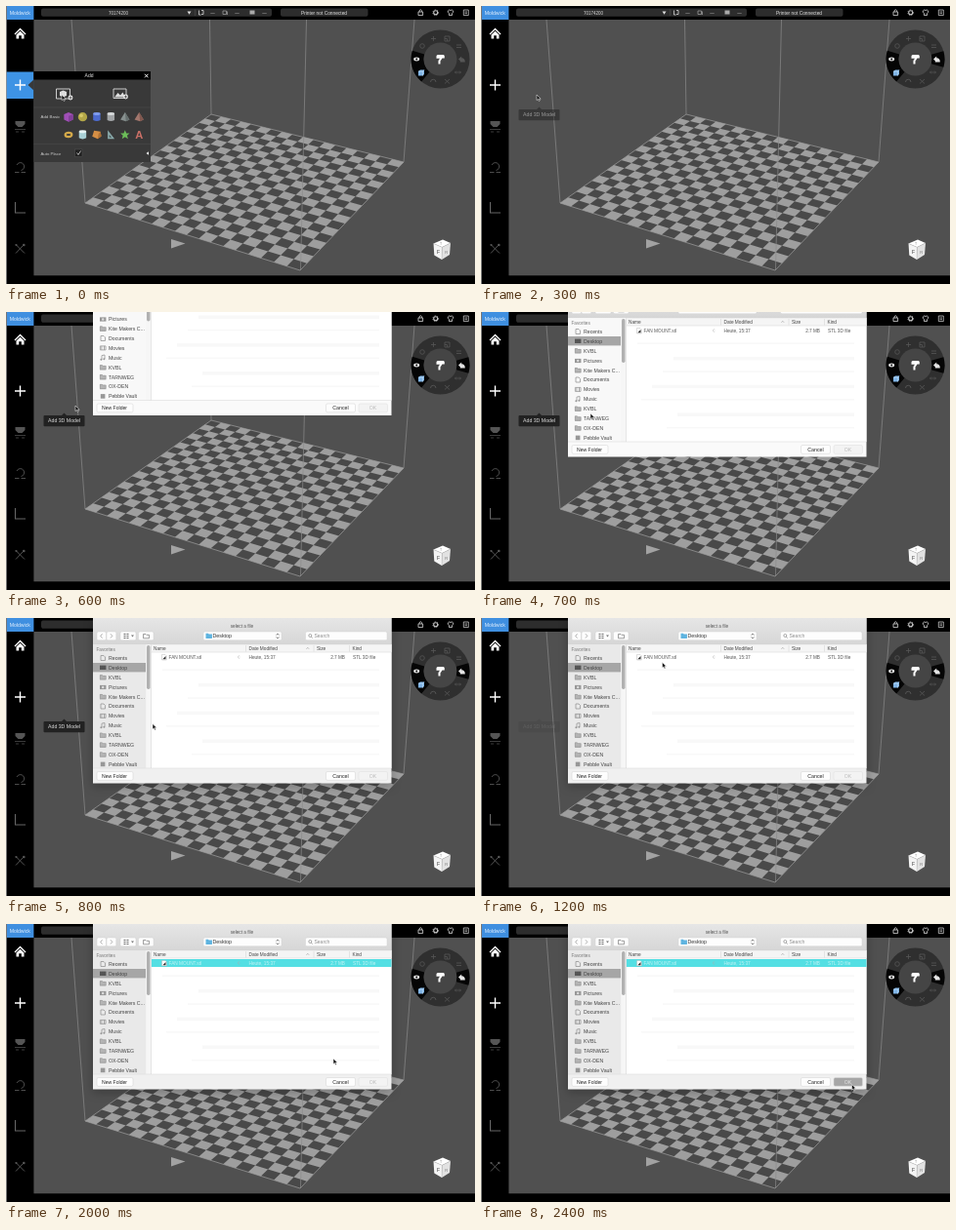
Write an HTML page that moves like this. It is 480 by 285 pixels and loops after 2500 ms.

```html
<!DOCTYPE html>
<html lang="en">
<head>
<meta charset="utf-8">
<title>Add a model</title>
<style>
html, body { margin: 0; width: 100%; height: 100%; overflow: hidden; background: #000; }
svg { display: block; width: 480px; height: 285px; font-family: "Liberation Sans", Arial, sans-serif; }
#dialog.settled { filter: drop-shadow(0 3px 5px rgba(0, 0, 0, .25)); }
</style>
</head>
<body>
<svg id="stage" viewBox="0 0 480 285" xmlns="http://www.w3.org/2000/svg"></svg>
<script>
const LOOP = 2500, STEP = 100;

// ---- drawing helpers ----
const rect = (x, y, w, h, fill, extra = '') =>
  `<rect x="${x}" y="${y}" width="${w}" height="${h}" fill="${fill}" ${extra}/>`;
const text = (x, y, s, size, fill, extra = '') =>
  `<text x="${x}" y="${y}" font-size="${size}" fill="${fill}" ${extra}>${s}</text>`;
const mid = 'text-anchor="middle"';
const path = (d, fill, extra = '') => `<path d="${d}" fill="${fill}" ${extra}/>`;
const line = (d, stroke, w = 1, extra = '') =>
  `<path d="${d}" fill="none" stroke="${stroke}" stroke-width="${w}" ${extra}/>`;
const circle = (x, y, r, fill, extra = '') =>
  `<circle cx="${x}" cy="${y}" r="${r}" fill="${fill}" ${extra}/>`;
const ellipse = (x, y, rx, ry, fill, extra = '') =>
  `<ellipse cx="${x}" cy="${y}" rx="${rx}" ry="${ry}" fill="${fill}" ${extra}/>`;
const at = (x, y, s, k = 1) => `<g transform="translate(${x} ${y}) scale(${k})">${s}</g>`;
const group = (id, s) => `<g id="${id}">${s}</g>`;

// ---- build plate in perspective ----
function floor() {
  const [x0, y0, x1, y1, x2, y2, x3, y3] = [81, 202, 301, 271, 407, 160, 210, 111];
  const ax = x1 - x2, ay = y1 - y2, bx = x3 - x2, by = y3 - y2;
  const sx = x0 - x1 + x2 - x3, sy = y0 - y1 + y2 - y3, den = ax * by - bx * ay;
  const g = (sx * by - bx * sy) / den, h = (ax * sy - sx * ay) / den;
  const pt = (u, v) => {
    const w = g * u + h * v + 1;
    const x = ((x1 - x0 + g * x1) * u + (x3 - x0 + h * x3) * v + x0) / w;
    const y = ((y1 - y0 + g * y1) * u + (y3 - y0 + h * y3) * v + y0) / w;
    return x.toFixed(2) + ' ' + y.toFixed(2);
  };
  const n = 18;
  let d = '';
  for (let i = 0; i < n; i++)
    for (let j = i % 2; j < n; j += 2)
      d += `M${pt(i / n, j / n)}L${pt((i + 1) / n, j / n)}L${pt((i + 1) / n, (j + 1) / n)}L${pt(i / n, (j + 1) / n)}Z`;
  const edge = 'M81 202L301 271L407 160L210 111Z';
  return path(edge, '#494949') + path(d, '#9e9e9e') + line(edge, '#a0a0a0', .7) +
    line('M67 14L81 202M208.5 14L210 111M418 14L407 160M307.5 14L301.5 271', '#8b8b8b', .7) +
    path('M169 239L183.5 243.5L169 248.5Z', '#a2a2a2');
}

// ---- application frame ----
function topBar() {
  const dash = x => text(x, 8.6, '—', 4.5, '#ccc', mid);
  const c = '#c4c4c4';
  return rect(0, 0, 480, 14, '#000') + rect(.8, 0, 27.6, 14, '#3f8fe0') +
    text(14.3, 8.8, 'Moldwick', 5.2, '#e4f0fc', mid) +
    rect(36, 2.5, 236, 8.3, '#2d2d2d', 'rx="2"') + rect(281, 2.5, 89.5, 8.3, '#2d2d2d', 'rx="2"') +
    text(115, 8.6, '70174200', 4.5, '#ddd', mid) +
    path('M185.5 5.5H189.5L187.5 8.8Z', '#ddd') +
    line('M193.5 3.5V10', '#555', .5) +
    line('M197.5 4.5V9H199.5M200 4.5H202V8.5H200', c, .9) + dash(211.5) +
    line('M222 5H225.5V8.5H222ZM226.5 5.5V9', '#999', .8) + dash(236.5) +
    rect(249.5, 4.5, 5, 4, '#aaa') + dash(264.5) +
    text(325.5, 8.6, 'Printer not Connected', 4.85, '#e2e2e2', mid) +
    line('M422 6H426.6V9.6H422ZM423 6V4.7Q424.3 2.7 425.6 4.7V6', c, .9) +
    circle(439.7, 6.7, 2, 'none', `stroke="${c}" stroke-width="1.1"`) +
    circle(439.7, 6.7, 2.8, 'none', `stroke="${c}" stroke-width=".8" stroke-dasharray="1.15 1.2"`) +
    line('M452.3 5Q453 3.4 455 4.4Q457 3.4 457.7 5Q458 7 456.5 7.5V9.6H453.5V7.5Q452 7 452.3 5Z', c, .9) +
    line('M468.3 4H473.3V9.6H468.3ZM469.5 6H472M469.5 7.7H472', c, .8);
}

function sideBar() {
  const dim = '#555';
  return rect(0, 14, 28.4, 271, '#000') + rect(0, 276.3, 480, 8.7, '#000') +
    group('active', rect(0, 67.5, 28.4, 27.5, '#3e93e4') + path('M28.4 75.5L22.5 81L28.4 86.5Z', '#393939')) +
    rect(0, 0, .8, 285, '#8c8c8c') +
    path('M8.5 28.5L14.5 22.5L20.5 28.5L19.6 29.5L14.5 24.5L9.4 29.5Z', '#fff') +
    path('M10.5 29.5L14.5 25.7L18.5 29.5V33.5H15.8V30.3H13.2V33.5H10.5Z', '#fff') +
    line('M14.5 75.5V86.5M9 81H20', '#fff', 1.4) +
    path('M9.5 118H19.5V121L16.5 124H12.5L9.5 121Z', dim) + line('M9 126.5H20M10 129H13M16 129H19', dim, .7) +
    line('M11 163A4 4 0 1 1 15.5 168.5M9 170.5H13.5M15.5 170.5H20', dim, .9) +
    line('M9.5 201V212H20', '#666', 1.1) +
    line('M10 244.5L19 253.5M18.5 244.5L10 253.5', dim, 1) +
    circle(10.5, 245, 1.1, dim) + circle(18.3, 245, 1.3, dim);
}

function wheel() {
  const cx = 444.5, cy = 54.5, R = 30, r = 17;
  const p = (rad, deg) => {
    const a = deg * Math.PI / 180;
    return (cx + rad * Math.cos(a)).toFixed(2) + ' ' + (cy + rad * Math.sin(a)).toFixed(2);
  };
  const sector = (a, b) => path(
    `M${p(R, a)}A${R} ${R} 0 0 1 ${p(R, b)}L${p(r, b)}A${r} ${r} 0 0 0 ${p(r, a)}Z`, '#050505');
  const undo = c => path('M463 54.5L466.2 51.5V53.3Q470 53.5 469.8 57.5H464.8V56.5H466.2V57.5Z', c);
  const dim = '#565656';
  let s = circle(cx, cy, R, '#2f2f2f') + sector(130, 197) +
    circle(cx, cy, r, '#454545');
  s += line('M435 33.5H440M437.5 31V36', dim, .8) +
    line('M449 31H454V36H449ZM449 33.5H451.5V36', dim, .8) +
    line('M461 40H466M461 42.5H466', dim, .8) +
    circle(426, 41, 2.3, 'none', `stroke="${dim}" stroke-width=".8"`) +
    line('M459.5 68H465.5M461 66.5L459.5 68L461 69.5M464 66.5L465.5 68L464 69.5', dim, .7) +
    line('M449 75L454 79.5M454 75L449 79.5', dim, .8) +
    line('M434.5 78A2.6 2.6 0 1 1 440 78', dim, .9);
  s += ellipse(420.2, 54.5, 3, 1.9, '#e8e8e8') + circle(420.2, 54.5, 1, '#111') +
    path('M422 67L424 65.5H428V70L426.5 71.5H422Z', '#7fb4e6') + line('M422 67H426.5V71.5M426.5 67L428 65.5', '#d5e8fa', .5) +
    undo(dim) + group('undo', sector(-16, 16) + undo('#e4e4e4'));
  return s + path('M440.5 51.5Q440.5 50 442 50H447.5Q448.8 50 448.8 51.5V53.5H446.5L444.5 56.5V59.5H442.5V56L444 53.8H440.5Z', '#fff');
}

const viewCube = () =>
  path('M437.5 243.5L447 239.5L455 243L446.3 247.3Z', '#fff') +
  path('M437.5 243.5L446.3 247.3L446 260L438.3 255.5Z', '#f4f4f4') +
  path('M446.3 247.3L455 243L454 255L446 260Z', '#e2e2e2') +
  line('M437.5 243.5L446.3 247.3L455 243M446.3 247.3L446 260', '#b5b5b5', .4) +
  text(441, 254.3, 'F', 5, '#333') + text(449.3, 253.5, 'R', 4, '#777') +
  text(444, 245, 'T', 3.5, '#888');

// ---- add panel ----
function addPanel() {
  const cyl = (c, top) => path('M-4 -3.5V3.5Q0 6 4 3.5V-3.5Z', c) + ellipse(0, -3.5, 4, 1.6, top);
  const cone = (c, shade) => path('M0 -5L5 3L1 5L-5 3Z', c) + path('M0 -5L5 3L1 5Z', shade);
  const shapes = [
    path('M-5 -3L0 -5L5 -3V3L0 5.5L-5 3Z', '#a04fb6') + path('M0 -1L5 -3V3L0 5.5Z', '#83409a'),
    circle(0, 0, 5, '#b3a748') + circle(-1.5, -1.5, 2, '#d5c968'),
    cyl('#4d6bd0', '#7f9bee'),
    cyl('#a2a5a7', '#d6d9da'),
    cone('#87908f', '#666f6e'),
    cone('#a3776d', '#80584f'),
    ellipse(0, 0, 3.6, 2.3, 'none', 'stroke="#d5aa4a" stroke-width="2.4"'),
    cyl('#a9d0d6', '#e8f5f6'),
    path('M-5 2L-3 -4.5L4 -3.5L5 1.5L1 4.5Z', '#d58f45') + path('M1 4.5L5 1.5L4 -3.5L2 -1Z', '#ad7034'),
    path('M-3.5 -5L4 4.5H-3.5Z', '#8aabac') + path('M-1.8 0L1 3H-1.8Z', '#4a5859'),
    path('M0 -5L1.5 -1.7L5 -1.5L2.3 .8L3.3 4.5L0 2.5L-3.3 4.5L-2.3 .8L-5 -1.5L-1.5 -1.7Z', '#6cbd59'),
    text(0, 4.2, 'A', 12, '#cb7067', mid + ' font-weight="bold"')
  ];
  const plus = (x, y) => circle(x, y, 2.4, '#eee') + line(`M${x - 1.5} ${y}H${x + 1.5}M${x} ${y - 1.5}V${y + 1.5}`, '#333', .7);
  let s = rect(28.4, 67, 119.6, 93, '#393939') + rect(28.4, 67, 119.6, 8.5, '#000') +
    line('M28.4 104H148M28.4 141.5H148', '#4a4a4a', .6) +
    text(85, 73.2, 'Add', 5, '#e8e8e8', mid) +
    line('M142 69.8L145.5 73.3M145.5 69.8L142 73.3', '#fff', 1) +
    line('M51.5 85H65.5V95H51.5Z', '#ddd', .9) + path('M55 88L58.5 86.5L62 88V92L58.5 93.5L55 92Z', '#ddd') + plus(66, 94) +
    line('M110 85H123V94.5H110Z', '#ddd', .9) + path('M111 93.5L114.5 89L117 91.5L119.5 88.5L122 93.5Z', '#ddd') + plus(122.5, 93) +
    text(35.5, 115.3, 'Add Basic', 4.4, '#ccc') + text(35.5, 153, 'Auto Place', 4.3, '#ccc') +
    rect(70.5, 147, 7.5, 7.5, '#202020', 'stroke="#555" stroke-width=".5"') +
    line('M72.5 150.5L74 152.5L76.5 148.5', '#ddd', .8) +
    path('M146 149.3V152.7L143.5 151Z', '#eee');
  shapes.forEach((g, i) => s += at(64 + i % 6 * 14.45, i < 6 ? 113.7 : 132, g, .93));
  return s;
}

// ---- file dialog ----
const folder = (x, y, c) => path(`M${x} ${y - 2.5}h2.4l.8 .8h3.2v4.5h-6.4z`, c);
function dialog() {
  const gray = '#979797', ink = '#444';
  const button = (x, y, w, h = 8.8) => rect(x, y, w, h, '#fdfdfd', 'rx="1.5" stroke="#d0d0d0" stroke-width=".5"');
  const icon = {
    page: (x, y) => line(`M${x + 1} ${y - 2.5}h3l1.5 1.5v3.5h-4.5z`, gray, .8),
    screen: (x, y) => rect(x, y - 2.3, 6.4, 4.4, '#555'),
    camera: (x, y) => rect(x, y - 1.8, 6.4, 4.2, gray) + circle(x + 3.2, y + .3, 1.2, '#ddd'),
    film: (x, y) => line(`M${x + .4} ${y - 2}h5.6v4h-5.6zM${x + 1.9} ${y - 2}v4M${x + 4.5} ${y - 2}v4`, gray, .8),
    note: (x, y) => line(`M${x + 2} ${y + 2}v-4.2l3 -.6v4`, gray, .8) + circle(x + 1.4, y + 2, 1, gray) + circle(x + 4.4, y + 1.4, 1, gray),
    square: (x, y) => rect(x + .8, y - 2.3, 4.6, 4.6, gray),
    folder: (x, y) => folder(x, y, '#b4b4b4') + line(`M${x + .3} ${y - 2.2}h2.1l.8 .8h2.9v3.4h-5.8z`, gray, .6)
  };
  const places = [['page', 'Recents'], ['screen', 'Desktop'], ['folder', 'KVBL'], ['camera', 'Pictures'],
    ['folder', 'Kite Makers C...'], ['page', 'Documents'], ['film', 'Movies'], ['note', 'Music'],
    ['folder', 'KVBL'], ['folder', 'TARNWEG'], ['folder', 'OX-DEN'], ['square', 'Pebble Vault']];

  let s = rect(89, 0, 305.5, 169.5, '#f0f0f0', 'id="base"') + rect(89, 0, 305.5, 27, 'url(#head)') +
    text(241.5, 9.8, 'select a file', 4.7, '#555', mid) +
    button(93, 14, 9.5) + button(103, 14, 9.8) + button(117, 14, 16) + button(135.5, 14, 15.5) +
    line('M98.5 16.3L96.7 18.4L98.5 20.5M107 16.3L108.8 18.4L107 20.5', '#999', .8) +
    line('M120.5 16.5H122.5M123.5 16.5H125.5M120.5 18.5H122.5M123.5 18.5H125.5M120.5 20.5H122.5M123.5 20.5H125.5', '#666', 1.1) +
    path('M128 17.5H131L129.5 19.5Z', '#777') + line('M140.5 16.5H143L143.8 17.3H146.5V20.8H140.5Z', '#777', .7) +
    button(202, 14, 80) + folder(204.5, 18.3, '#5fb4e0') + text(211.5, 20.4, 'Desktop', 5.3, '#333') +
    line('M276.5 17.5L278 16L279.5 17.5M276.5 19.5L278 21L279.5 19.5', '#555', .7) +
    button(306.5, 14, 83.5) + circle(311.3, 18, 1.5, 'none', 'stroke="#777" stroke-width=".6"') +
    line('M312.4 19.2L313.7 20.6', '#777', .7) + text(315.5, 20.3, 'Search', 5, '#8d8d8d');

  // list
  s += rect(148.5, 27, 246, 127, '#fff') + rect(148.5, 27, 246, 8, '#f5f5f5') +
    line('M89 27H394.5M148.5 35H394.5M245.5 28V34.5M315 28V34.5M351.5 28V34.5', '#d0d0d0', .5);
  [['Name', 151], ['Date Modified', 248.5], ['Size', 318], ['Kind', 354.5]].forEach(([n, x]) =>
    s += text(x, 32.7, n, 4.75, '#444'));
  s += line('M307.5 31.7L308.8 30.4L310.1 31.7', '#777', .5);
  for (let i = 0; i < 7; i++)
    s += rect(160 + i * 37 % 48, 52.5 + i * 14.4, 222 - i * 37 % 48, i % 2 ? 3.5 : 1.5, '#f8f8f8');
  s += rect(148.5, 36, 246, 8, '#54dfe3', 'id="pick"') +
    path('M159.5 37.5H163L164.3 38.8V43H159.5Z', '#fff', 'stroke="#aaa" stroke-width=".4"') +
    path('M160.3 42.3L163.5 39V42.3Z', '#333') +
    `<g id="row">` + text(166.5, 41.9, 'FAN MOUNT.stl', 4.75, 'inherit') +
    line('M239.3 39A1.2 1.2 0 1 0 239.3 41', '#aaa', .5) +
    text(248.5, 41.9, 'Heute, 15:37', 4.75, 'inherit') +
    text(347, 41.9, '2.7 MB', 4.7, 'inherit', 'text-anchor="end"') +
    text(355, 41.9, 'STL 3D file', 4.75, 'inherit') + '</g>';

  // places
  s += rect(89, 27.3, 59.5, 126.7, '#e9e9e9', 'id="places"') + rect(89, 46, 54, 9.4, '#a6a6a6') +
    text(92.5, 34.3, 'Favorites', 4.7, '#777');
  places.forEach(([k, n], i) => {
    const y = 41 + i * 9.9;
    s += icon[k](96, y) + text(105, y + 1.9, n, 5.2, ink);
  });
  s += rect(143.2, 27.3, 5.3, 126.7, '#f6f6f6') + rect(144, 28, 3.5, 45, '#b1b1b1', 'rx="1.7"') +
    line('M148.5 27V154M89 154H394.5', '#d4d4d4', .5);

  // buttons
  return s + button(93, 157.5, 37) + text(111, 163.8, 'New Folder', 5.1, '#222', mid) +
    button(327.5, 157.5, 30) + text(342.5, 163.8, 'Cancel', 5.3, '#222', mid) +
    rect(361, 157.5, 29.5, 8.8, '#f3f3f3', 'id="okBox" rx="1.5" stroke="#dcdcdc" stroke-width=".5"') +
    text(375.5, 163.8, 'OK', 5.2, '#bbb', mid + ' id="okText"');
}

const stage = document.getElementById('stage');
stage.innerHTML =
  `<defs><linearGradient id="head" x1="0" y1="0" x2="0" y2="1">
    <stop offset="0" stop-color="#e6e6e6"/><stop offset="1" stop-color="#d6d6d6"/></linearGradient></defs>` +
  rect(0, 0, 480, 285, '#505050') + floor() + topBar() + sideBar() + wheel() + viewCube() +
  group('panel', addPanel()) +
  group('tip', path('M57 106L59.5 103.5L62 106Z', '#222') + rect(38.5, 106, 42, 11.3, '#222', 'rx="1"') +
    text(59.5, 113.2, 'Add 3D Model', 5.2, '#ddd', mid)) +
  group('dialog', dialog()) +
  group('cursor', path('M0 0V5.6L1.4 4.4L2.3 6.5L3.3 6L2.4 4.1H4.2Z', '#111', 'stroke="#f2f2f2" stroke-width=".55"'));

const el = {};
for (const id of ['active', 'undo', 'panel', 'tip', 'dialog', 'base', 'places', 'cursor', 'pick', 'row', 'okBox', 'okText'])
  el[id] = document.getElementById(id);

// ---- motion: [time, value, ...] ----
const pointer = [[0, 57, 91], [500, 57, 91], [600, 71, 96], [700, 112, 104], [800, 150, 108.5],
  [900, 171, 88], [1000, 181, 60], [1200, 185.5, 45.5], [1400, 185.5, 40], [1600, 185.5, 40],
  [1800, 245, 78], [2000, 335, 138], [2200, 378, 164], [2400, 379.5, 164.5]];
const slide = [[400, -175], [500, -118], [600, -63.5], [700, -21], [800, 0]];
const tipFade = [[100, 0], [300, .5], [500, .95], [600, 1], [1000, 1], [1200, .1], [1300, 0]];

function track(keys, t, k = 1) {
  if (t <= keys[0][0]) return keys[0][k];
  for (let i = 1; i < keys.length; i++) {
    const a = keys[i - 1], b = keys[i];
    if (t <= b[0]) return a[k] + (b[k] - a[k]) * (t - a[0]) / (b[0] - a[0]);
  }
  return keys[keys.length - 1][k];
}

const show = (node, on) => node.setAttribute('visibility', on ? 'visible' : 'hidden');
const fill = (node, color) => node.setAttribute('fill', color);

function draw(time) {
  const t = Math.floor(time % LOOP / STEP) * STEP;
  const opened = t < 200, settled = t >= 800, picked = t >= 1500, pressed = t >= 2200;
  show(el.active, opened);
  show(el.panel, opened);
  show(el.undo, !opened);
  show(el.dialog, t >= 500);
  show(el.pick, picked);
  el.dialog.classList.toggle('settled', settled);
  el.tip.setAttribute('opacity', track(tipFade, t));
  el.dialog.setAttribute('transform', `translate(0 ${track(slide, t)})`);
  el.cursor.setAttribute('transform', `translate(${track(pointer, t, 1)} ${track(pointer, t, 2)})`);
  fill(el.base, settled ? '#f0f0f0' : '#fafafa');
  fill(el.places, settled ? '#e9e9e9' : '#f8f8f8');
  fill(el.row, picked ? '#c4f3f4' : '#555');
  fill(el.okBox, pressed ? '#a6a6a6' : '#f3f3f3');
  fill(el.okText, pressed ? '#e6e6e6' : '#bbb');
}

const start = performance.now();
function tick() {
  draw(performance.now() - start);
  requestAnimationFrame(tick);
}
tick();
</script>
</body>
</html>
```
